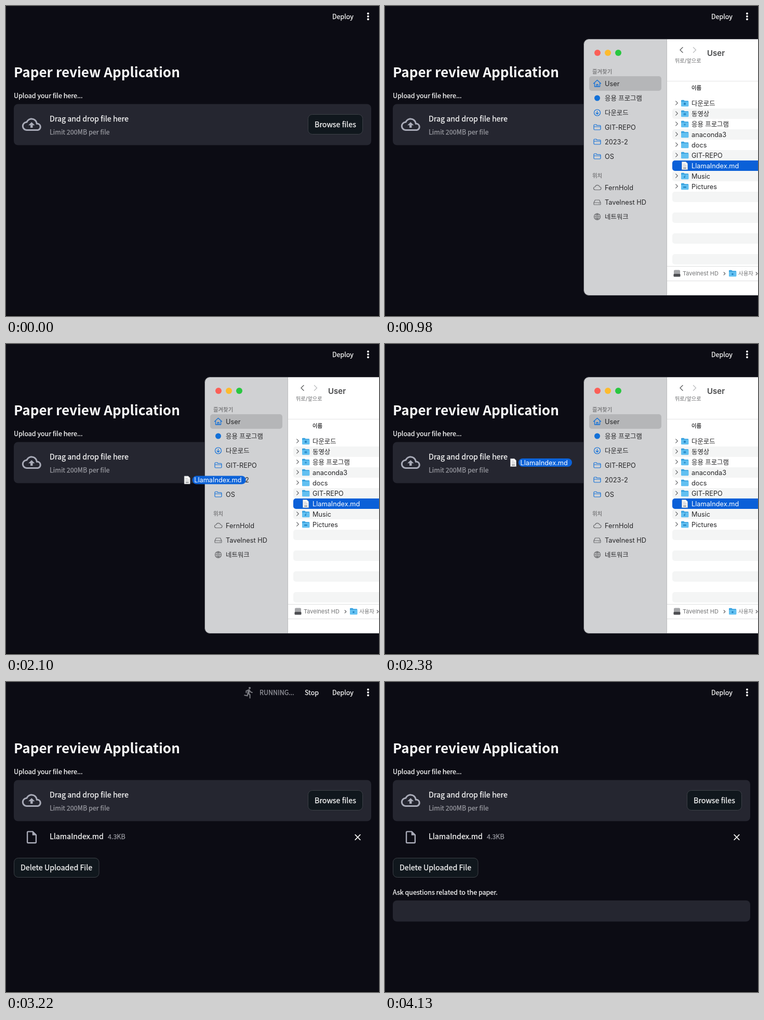
An HTML page for the animation above (4900 ms loop, 718 by 596 pixels).

```html
<!DOCTYPE html>
<html lang="en">
<head>
<meta charset="utf-8">
<title>Paper review Application</title>
<style>
html, body { margin: 0; width: 100%; height: 100%; overflow: hidden; background: #0c0c14; }
svg { display: block; }
text { white-space: pre; }
.app { font-family: "Noto Sans CJK KR", "Noto Sans CJK JP", "Noto Sans CJK", sans-serif; fill: #fafafa; stroke: #fafafa; stroke-width: .25; }
.dim { fill: #9a9ba2; stroke: #9a9ba2; }
.os { font-family: Inter, "Noto Sans CJK KR", "Noto Sans CJK", sans-serif; font-size: 12.75px; fill: #262628; }
.ko { font-size: 12.4px; }
.small { font-size: 10.4px; fill: #808183; }
.panel { fill: #252630; }
.btn { fill: #10171d; stroke: #3d4147; }
.line { fill: none; stroke-linecap: round; stroke-linejoin: round; }
</style>
</head>
<body>
<svg id="stage" width="718" height="596" viewBox="0 0 718 596"></svg>
<script>
const LOOP = 4900, STEP = 70;
const stage = document.getElementById('stage');

const rect = (x, y, w, h, r, attrs) =>
  `<rect x="${x}" y="${y}" width="${w}" height="${h}" rx="${r}" ${attrs}/>`;
const line = (d, color, width = 1.2) =>
  `<path class="line" d="${d}" stroke="${color}" stroke-width="${width}"/>`;
const disc = (x, y, r, color) => `<circle cx="${x}" cy="${y}" r="${r}" fill="${color}"/>`;
const ring = (x, y, r, color, width = 1.2) =>
  `<circle cx="${x}" cy="${y}" r="${r}" fill="none" stroke="${color}" stroke-width="${width}"/>`;
const appText = (x, y, size, str, cls = '', attrs = '') =>
  `<text class="app ${cls}" x="${x}" y="${y}" font-size="${size}" ${attrs}>${str}</text>`;
const isKo = s => /[가-힣]/.test(s);
const osText = (x, y, str, cls = '', style = '') =>
  `<text class="os ${isKo(str) ? 'ko' : ''} ${cls}" x="${x}" y="${y}" style="${style}">${str}</text>`;
const group = (id, body, attrs = '') => `<g id="${id}" ${attrs}>${body}</g>`;

// Web page
const cloud = `<path transform="translate(30.8 209.3) scale(1.54)" fill="#a9abb8" d="M19.35 10.04A7.49 7.49 0 0 0 12 4C9.11 4 6.6 5.64 5.35 8.04A6 6 0 0 0 0 14c0 3.31 2.69 6 6 6h13c2.76 0 5-2.24 5-5 0-2.64-2.05-4.78-4.65-4.96zM19 18H6c-2.21 0-4-1.79-4-4 0-2.05 1.53-3.76 3.56-3.97l1.07-.11.5-.95A5.47 5.47 0 0 1 12 6c2.62 0 4.88 1.86 5.39 4.43l.3 1.5 1.53.11A2.98 2.98 0 0 1 22 15c0 1.65-1.35 3-3 3zM8 13h2.55v3h2.9v-3H16l-4-4z"/>`;
const sheet = `<path transform="translate(35.1 284) scale(1.2)" fill="#a9abb8" d="M14 2H6c-1.1 0-2 .9-2 2v16c0 1.1.9 2 2 2h12c1.1 0 2-.9 2-2V8l-6-6zM6 20V4h7v5h5v11H6z"/>`;

const page =
  rect(0, 0, 718, 596, 0, 'fill="#0c0c14"') +
  rect(0, 594, 718, 2, 0, 'fill="#07070c"') +
  appText(628, 25, 12.5, 'Deploy') +
  [14.5, 20, 25.5].map(y => disc(697, y, 2, '#fafafa')).join('') +
  appText(15, 136.5, 26.05, 'Paper review Application', '', 'font-weight="700" style="stroke:none"') +
  appText(15, 177, 12.55, 'Upload your file here...') +
  rect(15, 188.5, 688, 79, 8, 'class="panel"') +
  cloud +
  appText(84, 222.2, 14.3, 'Drag and drop file here') +
  appText(84, 247.2, 12.55, 'Limit 200MB per file', 'dim') +
  rect(581.5, 208.5, 105, 38, 8, 'class="btn"') +
  appText(594, 233, 14.3, 'Browse files');

const fileRow = sheet + line('M672.2 293.7l9.6 9.6m0-9.6l-9.6 9.6', '#fafafa', 1.7);
const uploading =
  appText(84, 302, 14.3, 'LlamaInde<tspan letter-spacing=".8">...</tspan>') +
  rect(179, 294, 488, 8, 4, 'class="panel"') +
  `<rect id="bar" x="179" y="294" width="5" height="8" rx="2.5" fill="#2a6fc0"/>`;
const uploaded =
  appText(84, 302, 14.3, 'LlamaIndex.md') + appText(196, 302, 12.5, '4.3KB', 'dim');
const remove =
  rect(15.5, 338.5, 163.5, 37, 8, 'class="btn"') + appText(28, 362, 14.3, 'Delete Uploaded File');
const ask =
  appText(15, 409, 12.55, 'Ask questions related to the paper.') +
  rect(15, 420, 688, 40.5, 8, 'class="panel"');

// Status pictograms on a 24 unit grid
const GREY = '#7a7b81';
const sports = {
  swim: disc(16.5, 7.5, 2.5, GREY) +
    line('M4 12l6-5 5 5M3 14.5q3 2.6 6 0t6 0 6 0M3 19q3 2.6 6 0t6 0 6 0', GREY, 2),
  bike: ring(5, 17, 4.25, GREY, 1.5) + ring(19, 17, 4.25, GREY, 1.5) + disc(15.5, 3.5, 2, GREY) +
    line('M12 18.5V13.5L8.5 9.8 12.5 6l2.5 2.5q1.8 1.5 4.5 1.5', GREY, 2),
  run: `<path fill="${GREY}" d="M13.49 5.48c1.1 0 2-.9 2-2s-.9-2-2-2-2 .9-2 2 .9 2 2 2zm-3.6 13.9l1-4.4 2.1 2v6h2v-7.5l-2.1-2 .6-3c1.3 1.5 3.3 2.5 5.5 2.5v-2c-1.9 0-3.5-1-4.3-2.4l-1-1.6c-.4-.6-1-1-1.7-1-.3 0-.5.1-.8.1l-5.2 2.2v4.7h2v-3.4l1.8-.7-1.6 8.1-4.9-1-.4 2 7 1.4z"/>`,
  skate: disc(14.5, 3.5, 2, GREY) + disc(7, 22, 1.2, GREY) + disc(16, 22, 1.2, GREY) +
    line('M4 11l3-4 5 .5-2.5 5 4 2.5 1.5 4M9.5 12.5L7 18M12 8l3 3h4M3 18.5l2 1h13l2-1', GREY, 1.8),
  row: disc(15, 3, 2, GREY) +
    line('M7 11.4q3 0 5-2.4l2-2 2 1.5v6L14 14M9.5 13L18 21.5M8.5 15.5L5 19M10 16h3', GREY, 2) +
    `<path fill="${GREY}" d="M15 19.5L16.5 18H18l3 3-3 3-3-3z"/>`
};
const poses = Object.keys(sports);
const status =
  poses.map(k => group(k, sports[k], 'transform="translate(455.3 8) scale(1.02)"')).join('') +
  appText(488, 25, 12.5, 'RUNNING...', 'dim') + appText(575, 25, 12.5, 'Stop');

// File window
const BLUE = '#1270d8', SLATE = '#6b6c6f';
const folderLine = (y, color) =>
  line(`M402 ${y - 3.5}q0-1.5 1.5-1.5h3l1.5 1.5h5.5q1.5 0 1.5 1.5v5.5q0 1.5-1.5 1.5h-10q-1.5 0-1.5-1.5zM402 ${y - 1}h13`, color);
const sideIcons = {
  home: y => line(`M401.5 ${y}l7-6.5 7 6.5M403.5 ${y - 1}v7h10v-7M407 ${y + 6}v-4h3v4`, BLUE, 1.3),
  apps: y => disc(408.5, y, 5.5, BLUE),
  down: y => ring(408.5, y, 6, BLUE) + line(`M408.5 ${y - 3}v6m-2.5-2.5l2.5 2.5 2.5-2.5`, BLUE),
  folder: y => folderLine(y, BLUE),
  cloud: y => line(`M404.5 ${y + 4.5}q-3-.5-3-3 0-2.5 3-3 1-3 4-3.2 3.5 0 4.5 3.2 3 .5 3 3t-3 3z`, SLATE),
  disk: y => line(`M402 ${y + 1}l2.5-5h8l2.5 5v3q0 1-1 1h-11q-1 0-1-1zM402 ${y + 1}h13M412 ${y + 3}h.5`, SLATE),
  globe: y => ring(408.5, y, 6, SLATE) + line(`M402.5 ${y}h12M408.5 ${y - 6}v12M404.5 ${y - 4}q4 2 8 0M404.5 ${y + 4}q4-2 8 0M408.5 ${y - 6}q-6 6 0 12 6-6 0-12`, SLATE, .9)
};
const places = [
  [149, 'home', 'User'], [177, 'apps', '응용 프로그램'], [205, 'down', '다운로드'],
  [233, 'folder', 'GIT-REPO'], [261, 'folder', '2023-2'], [289, 'folder', 'OS'],
  [349, 'cloud', 'FernHold'], [377, 'disk', 'Tavelnest HD'], [405, 'globe', '네트워크']
];
const files = ['다운로드', '동영상', '응용 프로그램', 'anaconda3', 'docs', 'GIT-REPO', 'LlamaIndex.md', 'Music', 'Pictures'];
const badges = {
  0: y => disc(577, y + 1, 2.2, '#2485c4'),
  1: y => rect(574.5, y - 1, 5, 4, 1, 'fill="#2f92d0"'),
  2: y => disc(577, y + 1, 1.8, '#2f92d0'),
  7: y => disc(576.3, y + 2, 1.4, '#2485c4') + line(`M577.5 ${y + 2}v-4`, '#2485c4', .9),
  8: y => rect(574, y, 6, 2.4, .6, 'fill="#2485c4"')
};
const folder = (x, y) =>
  `<path fill="#3aa3e0" d="M${x - 7} ${y + 5}v-10q0-1.2 1.2-1.2h4l1.6 1.5h6.2q1.2 0 1.2 1.2v8.5z"/>` +
  rect(x - 7, y - 3, 14.3, 9.3, 1.2, 'fill="#62c0f1"');
const doc = (x, y) =>
  `<path fill="#fafafa" stroke="#b4b6ba" stroke-width=".7" d="M${x - 5.5} ${y - 7.5}h7.5l3.5 3.5v11.5h-11z"/>` +
  line(`M${x - 3} ${y - 3}h4M${x - 3} ${y - .5}h6M${x - 3} ${y + 2}h6`, '#a5a7ab', .8) +
  rect(x - 3, y + 3.7, 6, 2, 0, 'fill="#8e9094"');
const chevron = (x, y, h, color, width) => line(`M${x - h / 2} ${y - h}l${h} ${h}l${-h} ${h}`, color, width);

const fileRows = files.map((name, i) => {
  const y = 187 + i * 20, isDoc = i === 6;
  return (isDoc ? doc(577, y) : chevron(561.5, y - .5, 3.6, '#6e6f72', 1.3) + folder(577, y) + (badges[i] ? badges[i](y) : '')) +
    osText(590, y + 4.7, name, '', isDoc ? 'fill:#fff' : '');
}).join('');
const stripes = Array.from({length: 8}, (_, i) => rect(553, 197 + i * 40, 180, 20, 5, 'fill="#f4f5f5"')).join('');

const win =
  rect(382.5, 63.5, 360, 493, 10, 'fill="#d0d1d3" stroke="#44454b"') +
  rect(543, 64, 175, 492, 0, 'fill="#fff"') +
  rect(542, 64, 1, 492, 0, 'fill="#bdbec0"') +
  ['#fb5f57', '#fdbb2e', '#29c740'].map((c, i) => disc(409 + i * 20, 90, 6, c)).join('') +
  osText(399, 129.5, '즐겨찾기', 'small', 'font-weight:700') +
  osText(399, 329.5, '위치', 'small', 'font-weight:700') +
  rect(393, 135, 139, 28, 5, 'fill="#b5b6b8"') +
  places.map(([y, icon, name]) => sideIcons[icon](y) + osText(423, y + 4.7, name)).join('') +
  group('hover', rect(393, 275, 139, 28, 5, 'fill="#0a62d3"') + folderLine(289, '#fff') +
    osText(423, 293.7, 'OS', '', 'fill:#fff')) +
  line('M573 79.5l-5 5 5 5', '#5f6062', 1.4) + line('M593.5 79.5l5 5-5 5', '#bcbdbf', 1.4) +
  osText(558, 109, '뒤로/앞으로', '', 'font-size:10.2px;fill:#6a6b6d') +
  osText(620, 95.5, 'User', '', 'font-size:15px;font-weight:600;fill:#47484a') +
  rect(543, 144, 175, 1, 0, 'fill="#e4e4e5"') +
  osText(590, 160.7, '이름', '', 'font-size:10.4px;stroke:#262628;stroke-width:.25') +
  stripes + rect(553, 297, 180, 20, 5, 'fill="#0a60d8"') + fileRows +
  rect(543, 500, 175, 1, 0, 'fill="#dededf"') + rect(543, 528, 175, 1, 0, 'fill="#dededf"') +
  rect(556, 507.5, 12, 12.5, 2, 'fill="#a5a6a9"') + rect(555.5, 515, 13, 5.5, 1.5, 'fill="#4d4e52"') +
  osText(573, 518, 'Tavelnest HD', '', 'font-size:11px;fill:#737476') +
  chevron(653.5, 514.5, 2.6, '#59595c', 1.2) + folder(669, 514) + disc(669, 515.5, 1.8, '#2485c4') +
  osText(680, 518, '사용자', '', 'font-size:10.5px;fill:#737476') +
  chevron(715.5, 514.5, 2.6, '#59595c', 1.2);

const drag =
  group('halo', disc(-1, 4, 17, 'rgba(0,0,0,.05)')) + doc(0, 0) +
  group('pill', rect(10, -8, 103, 16, 8, 'fill="#0b62d8"') + osText(13.5, 4.6, 'LlamaIndex.md', '', 'fill:#fff'));

stage.innerHTML = page + group('fileRow', fileRow) + group('uploading', uploading) + group('uploaded', uploaded) +
  group('remove', remove) + group('ask', ask) + group('status', status) + group('win', win) + group('drag', drag);

const el = id => document.getElementById(id);
const show = (id, on) => el(id).style.display = on ? '' : 'none';
const clamp = v => Math.min(1, Math.max(0, v));
const within = (t, a, b) => t >= a && t < b;

function draw(time) {
  const t = Math.floor(time / STEP) * STEP;

  show('win', within(t, 700, 2520));
  show('drag', within(t, 1890, 2520));
  show('hover', within(t, 1890, 2030));
  const k = clamp((t - 1890) / 490), p = 1 - Math.pow(1 - k, 1.6);
  el('drag').setAttribute('transform', `translate(${496 - 249 * p} ${310 - 82 * p})`);
  el('pill').setAttribute('opacity', clamp(.36 + k * 1.6));
  show('halo', k === 0);

  show('fileRow', t >= 2520);
  show('uploading', within(t, 2520, 2660));
  el('bar').setAttribute('width', t < 2590 ? 5 : 488);
  show('uploaded', t >= 2660);
  show('remove', t >= 2730);
  show('ask', t >= 3850);

  show('status', within(t, 2660, 4130));
  const fade = t < 3850 ? (t - 2590) / 210 : (4130 - t) / 280;
  el('status').setAttribute('opacity', clamp(fade));
  const pose = Math.min(4, Math.max(0, Math.floor((t - 2800) / 210)));
  poses.forEach((id, i) => show(id, i === pose));
}

const start = performance.now();
function tick() {
  draw((performance.now() - start) % LOOP);
  requestAnimationFrame(tick);
}
tick();
</script>
</body>
</html>
```
